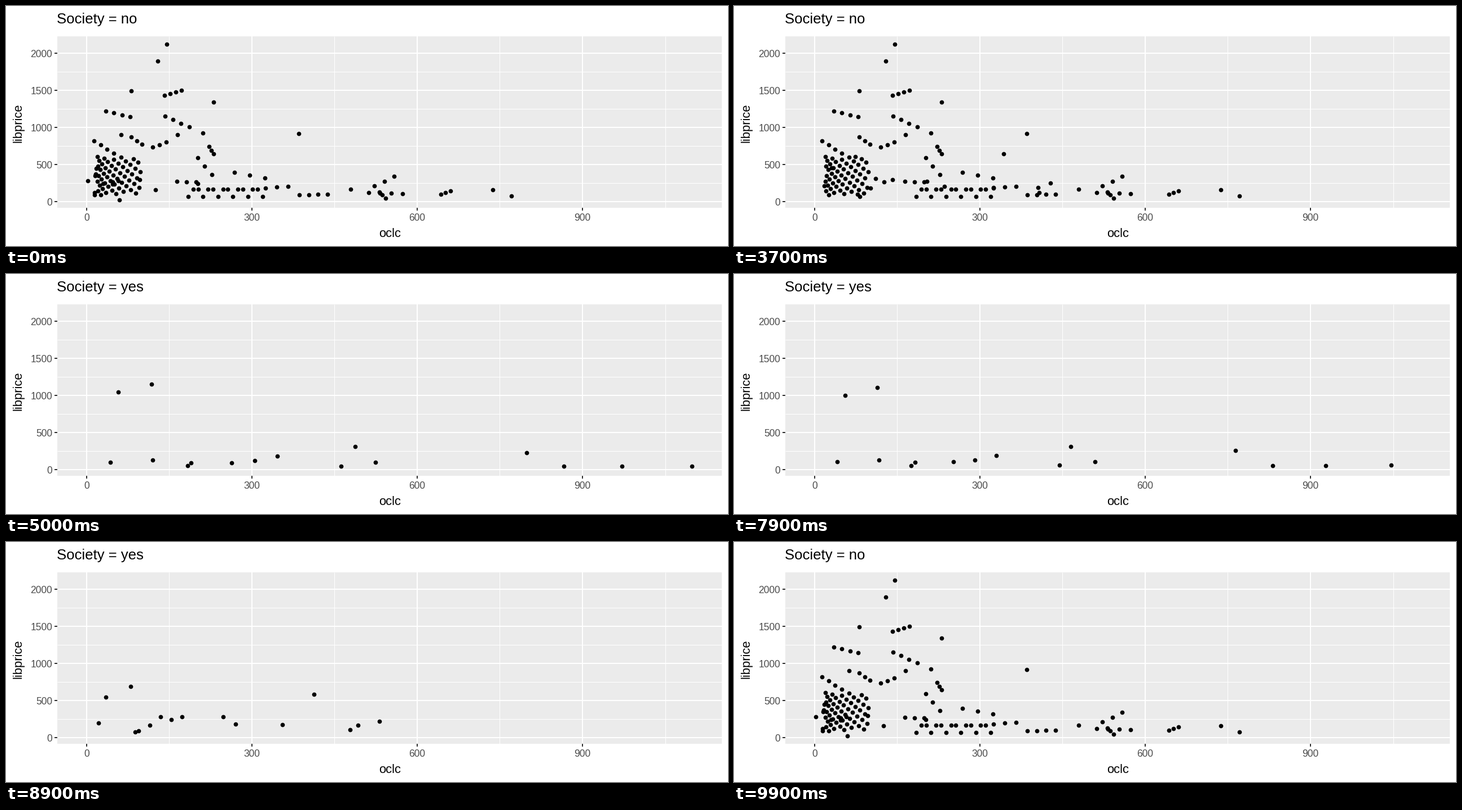
Write a matplotlib script that moves like this. It is 1280 by 427 pixels and loops after 10000 ms.

```python
import numpy as np
import matplotlib.pyplot as plt
from matplotlib.animation import FuncAnimation
from matplotlib.patches import Rectangle

W, H, DPI = 1280, 427, 128
PT = 72 / DPI  # points per pixel
FRAMES, INTERVAL, STEPS = 100, 100, 21
LEFT, RIGHT, TOP, BOTTOM = 91, 1269, 54, 359

plt.rcParams["font.family"] = "Liberation Sans"

# Points tweened between the two states: x, y for "no", then x, y for "yes"
MOVERS = np.array([
    (156.5, 336, 199, 210), (188.5, 313, 257.5, 196),
    (144.5, 311, 185, 335), (201, 345, 260, 330.5),
    (156.5, 331.5, 321.5, 341), (188.5, 317, 328, 336),
    (159.5, 289, 400, 336), (158, 302, 440.5, 332),
    (159, 300, 480.5, 324), (236.5, 308.5, 594, 342),
    (172, 315.5, 618.5, 307), (340, 315.5, 655, 335),
    (203.5, 228.5, 923, 318), (265, 326.5, 989, 342),
    (199, 310.5, 1092, 342), (159, 298.5, 1215.5, 342),
])

# Points shown only in the "no" state: lone ones, then runs from end to end
LONE = [
    (285, 68), (269, 98), (222, 150.5), (368, 171), (518.5, 227),
    (349, 226), (304, 229), (610.5, 326), (863, 327), (895.5, 338),
]
TRIPLES = [
    (222, 233, 241, 246), (260, 251, 284, 242), (360, 250, 367.5, 263),
    (340, 270, 364.5, 300), (302.5, 312, 337, 313), (460, 324, 500, 320.5),
    (662, 330.5, 672.5, 342), (653, 320, 688, 303),
    (404.5, 295.5, 458.5, 306), (771, 335, 787.5, 329),
]
QUADS = [
    (281, 159, 311, 150), (176.5, 187, 220, 197), (281.5, 196, 324.5, 215),
    (520, 336, 570, 335), (156, 240, 190.5, 262), (643, 332, 702.5, 334),
]


def runs(ends, n):
    ends = np.array(ends)
    return np.linspace(ends[:, :2], ends[:, 2:], n).reshape(-1, 2)


def still_points():
    i = np.arange(53)
    spread = (i * 0.618034) % 1
    corner = np.column_stack([162 + 78 * spread ** 1.3, 268 + 1.3 * i])
    i = np.arange(16)
    strip = np.column_stack([323 + 8.8 * i, 330 + 9 * np.cos(2 * np.pi * i / 3)])
    return np.vstack([LONE, runs(TRIPLES, 3), runs(QUADS, 4), corner, strip])


STILL = still_points()

fig = plt.figure(figsize=(W / DPI, H / DPI), dpi=DPI, facecolor="white")
ax = fig.add_axes([0, 0, 1, 1])
ax.set_xlim(0, W)
ax.set_ylim(H, 0)
ax.axis("off")


def line(x0, y0, x1, y1, color="white", width=2, z=2):
    ax.plot([x0, x1], [y0, y1], color=color, lw=width * PT, zorder=z,
            solid_capstyle="butt")


def label(x, y, text, size, color="black", **kw):
    return ax.text(x, y, text, fontsize=size * PT, color=color,
                   **{"va": "baseline", **kw})


def draw_panel():
    ax.add_patch(Rectangle((LEFT, TOP), RIGHT - LEFT, BOTTOM - TOP,
                           color="#EBEBEB", lw=0, zorder=0))
    dx, dy = 293.1, 66
    for i in range(5):
        x, y = 142.7 + dx * i, 348.2 - dy * i
        line(LEFT, y, RIGHT, y)
        line(LEFT - 5, y, LEFT, y, "#333333")
        label(82, y + 6.7, str(500 * i), 17.5, "#4D4D4D", ha="right")
        if i < 4:
            line(x + dx / 2, TOP, x + dx / 2, BOTTOM, width=1, z=1)
            line(LEFT, y - dy / 2, RIGHT, y - dy / 2, width=1, z=1)
            line(x, TOP, x, BOTTOM)
            line(x, BOTTOM, x, BOTTOM + 5, "#333333")
            label(x, 382.5, str(300 * i), 17.5, "#4D4D4D", ha="center")
    label(680.5, 411, "oclc", 22, ha="center")
    label(21.5, 208, "libprice", 22, rotation=90, ha="center", va="center")


draw_panel()
title = label(90.5, 30.5, "", 25.7)
dots = ax.scatter([], [], s=(7.7 * PT) ** 2, c="black", lw=0, zorder=3)


def progress(k):
    """Share of the way from "no" (0) to "yes" (1)."""
    out = np.clip((k - 29) / STEPS, 0, 1)
    back = np.clip((k - 78) / STEPS, 0, 1)
    return out - back


def update(k):
    t = progress(k)
    pts = MOVERS[:, :2] * (1 - t) + MOVERS[:, 2:] * t
    if k < 50 or k == FRAMES - 1:
        pts = np.vstack([pts, STILL])
    dots.set_offsets(pts)
    title.set_text("Society = " + ("yes" if 41 <= k < 90 else "no"))
    return dots, title


anim = FuncAnimation(fig, update, frames=FRAMES, interval=INTERVAL,
                     repeat=True, repeat_delay=0, blit=False)
plt.show()
```
